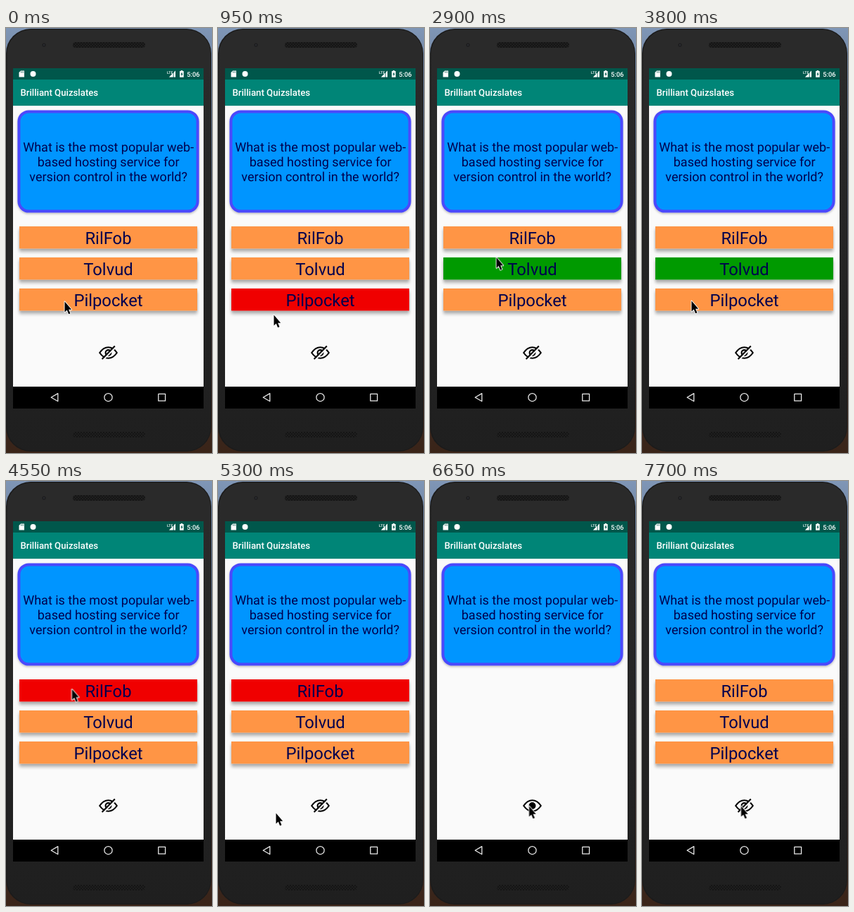
An HTML page for the animation above (8 s loop, 293x602 px).

```html
<!DOCTYPE html>
<html lang="en">
<head>
<meta charset="utf-8">
<title>Flashcard quiz</title>
<style>
  html, body { margin: 0; width: 100%; height: 100%; overflow: hidden; background: #262626; }
  svg { display: block; width: 293px; height: 602px; }
  text { font-family: Roboto, "Open Sans", sans-serif; text-rendering: geometricPrecision; }
  .mid { text-anchor: middle; }
  .question { font-size: 18px; fill: #00004e; }
  .answer text { font-size: 23.8px; fill: #00004e; }
  .answer rect { fill: #ff9544; }
  .timed, .answer rect { animation: 8s step-end infinite; }

  .answer .first { animation-name: first; }
  .answer .second { animation-name: second; }
  .answer .third { animation-name: third; }
  #answers, #shut { animation-name: hide; }
  #open { animation-name: show; }
  #pointer { animation-name: travel; }

  @keyframes third { 0%, 19.375%, 100% { fill: #ff9544; } 6.25% { fill: #f00000; } }
  @keyframes second { 0%, 49.375%, 100% { fill: #ff9544; } 36.25% { fill: #009a00; } }
  @keyframes first { 0%, 70%, 100% { fill: #ff9544; } 56.875% { fill: #f00000; } }
  @keyframes hide { 0%, 96.25%, 100% { visibility: visible; } 83.125% { visibility: hidden; } }
  @keyframes show { 0%, 96.25%, 100% { visibility: hidden; } 83.125% { visibility: visible; } }

  @keyframes travel {
    0% { transform: translate(83px, 387px); }
    11.875% { transform: translate(79px, 406px); }
    13.75% { transform: translate(71px, 438px); }
    15.625% { transform: translate(68px, 450px); }
    23.125% { transform: translate(70px, 436px); }
    25% { transform: translate(80px, 384px); }
    26.875% { transform: translate(91px, 336px); }
    28.75% { transform: translate(94px, 324.5px); }
    40% { transform: translate(73px, 390px); }
    41.875% { transform: translate(58px, 433px); }
    45.625% { transform: translate(60px, 424px); }
    47.5% { transform: translate(70px, 386px); }
    49.375% { transform: translate(82px, 339px); }
    51.25% { transform: translate(91px, 304px); }
    53.125% { transform: translate(93.5px, 294.5px); }
    60.625% { transform: translate(92px, 318px); }
    62.5% { transform: translate(87px, 390px); }
    64.375% { transform: translate(83px, 452px); }
    66.25% { transform: translate(82px, 470px); }
    70% { transform: translate(86px, 470px); }
    71.875% { transform: translate(101px, 468px); }
    73.75% { transform: translate(119px, 465px); }
    75.625% { transform: translate(134px, 461px); }
    77.5%, 100% { transform: translate(140.5px, 460px); }
  }
</style>
</head>
<body>
<svg viewBox="0 0 293 602" xmlns="http://www.w3.org/2000/svg">
  <defs>
    <linearGradient id="wall" x2="0" y2="1">
      <stop offset="0" stop-color="#7f96b6"/>
      <stop offset=".3" stop-color="#55637a"/>
      <stop offset=".7" stop-color="#3a3030"/>
      <stop offset="1" stop-color="#3a2418"/>
    </linearGradient>
    <linearGradient id="body" x2="0" y2="1">
      <stop offset=".1" stop-color="#2a2a2a"/>
      <stop offset="1" stop-color="#1f1f1f"/>
    </linearGradient>
    <pattern id="mesh" width="4" height="4" patternUnits="userSpaceOnUse">
      <rect width="4" height="4" fill="#151515"/>
      <circle cx="1" cy="1" r=".7" fill="#303030"/>
      <circle cx="3" cy="3" r=".7" fill="#303030"/>
    </pattern>
    <filter id="lift" x="-10%" y="-30%" width="120%" height="190%">
      <feDropShadow dx="0" dy="4.5" stdDeviation="2.2" flood-color="#000" flood-opacity=".26"/>
      <feDropShadow dx="0" dy="1" stdDeviation="1.4" flood-color="#000" flood-opacity=".14"/>
    </filter>
    <filter id="soft" x="-5%" y="-5%" width="110%" height="112%">
      <feDropShadow dx="0" dy="1.5" stdDeviation="1.6" flood-color="#000" flood-opacity=".28"/>
    </filter>
  </defs>

  <!-- phone body -->
  <rect width="293" height="602" fill="url(#wall)"/>
  <rect x="0" y="1" width="292" height="599" rx="35" fill="#1b1b1b"/>
  <rect x="1.5" y="2.5" width="289.5" height="596" rx="34" fill="url(#body)"/>
  <circle cx="54" cy="24" r="2.6" fill="#1d1d1f"/>
  <circle cx="54" cy="24" r="1.1" fill="#303236"/>
  <rect x="95" y="20" width="103" height="8" rx="4" fill="url(#mesh)"/>
  <rect x="95" y="572" width="103" height="8" rx="4" fill="url(#mesh)"/>

  <!-- screen -->
  <rect x="10" y="57" width="271" height="482" fill="#fafafa"/>
  <rect x="10" y="110" width="271" height="1" fill="#e6eae9"/>
  <rect x="10" y="57" width="271" height="16.5" fill="#00574b"/>
  <rect x="10" y="73" width="271" height="37" fill="#008577"/>
  <rect x="10" y="508" width="271" height="31"/>

  <!-- status bar -->
  <g fill="#fff">
    <path d="M21 60.5h5v9h-7.5v-6.5z"/>
    <path d="M21.3 61.5v2M23 61.5v2M24.7 61.5v2" stroke="#00574b" stroke-width=".7"/>
    <circle cx="38.5" cy="65" r="4"/>
    <text x="229" y="65" font-size="5.2" font-weight="500">LTE</text>
    <path d="M241 60.5v9h-9z" opacity=".45"/>
    <path d="M237.5 64v5.5H232zM241 60.5v9h-2v-7z"/>
    <path d="M248.7 60h2.4v1h1.6v8.7h-5.6V61h1.6z"/>
    <path d="M250.4 62.2l-2 3.6h1.2v2.6l2-3.6h-1.2z" fill="#00574b"/>
    <text x="257.3" y="68.6" font-size="9.3" font-weight="500">5:06</text>
    <text x="20.5" y="96.3" font-size="13.2" font-weight="500">Brilliant Quizslates</text>
  </g>

  <!-- question -->
  <rect x="18.4" y="118.4" width="254.2" height="141.2" rx="14" fill="#0095ff" stroke="#4b48fb" stroke-width="4" filter="url(#soft)"/>
  <g class="question mid">
    <text x="145.7" y="175">What is the most popular web-</text>
    <text x="145.7" y="196">based hosting service for</text>
    <text x="145.7" y="217">version control in the world?</text>
  </g>

  <!-- answers -->
  <g id="answers" class="timed">
    <g class="answer mid">
      <g filter="url(#lift)"><rect class="first" x="19" y="281" width="253" height="31.4"/></g>
      <text x="145.5" y="306">RilFob</text>
    </g>
    <g class="answer mid">
      <g filter="url(#lift)"><rect class="second" x="19" y="325" width="253" height="31.4"/></g>
      <text x="145.5" y="350">Tolvud</text>
    </g>
    <g class="answer mid">
      <g filter="url(#lift)"><rect class="third" x="19" y="369" width="253" height="31.4"/></g>
      <text x="145.5" y="394">Pilpocket</text>
    </g>
  </g>

  <!-- eye button -->
  <g fill="none" stroke="#000" stroke-width="2.1">
    <path d="M133.2 460Q138.5 452.3 145.5 452.3T157.8 460Q152.5 467.7 145.5 467.7T133.2 460z" stroke-linejoin="round"/>
    <circle cx="145.5" cy="460" r="3.9"/>
    <g id="shut" class="timed">
      <path d="M138.3 470L156.3 452" stroke="#fafafa" stroke-width="2"/>
      <path d="M136.6 469L154.8 450.6"/>
    </g>
    <circle id="open" class="timed" cx="145.5" cy="460" r="2.6" fill="#000"/>
  </g>

  <!-- navigation bar -->
  <g fill="none" stroke="#e8e8e8" stroke-width="1.3" stroke-linejoin="round">
    <path d="M73.8 517.6v11.2l-9.6-5.6z"/>
    <circle cx="145.5" cy="523.2" r="5.6"/>
    <rect x="216.8" y="518.4" width="9.8" height="9.8"/>
  </g>

  <g id="pointer" class="timed">
    <path d="M.5 .5V15.6L3.7 12.6L6.1 18.2L8.5 17.2L6.1 11.8H10.2z" stroke="#fff" stroke-width="1.8" stroke-linejoin="round" paint-order="stroke"/>
  </g>
</svg>
</body>
</html>
```
